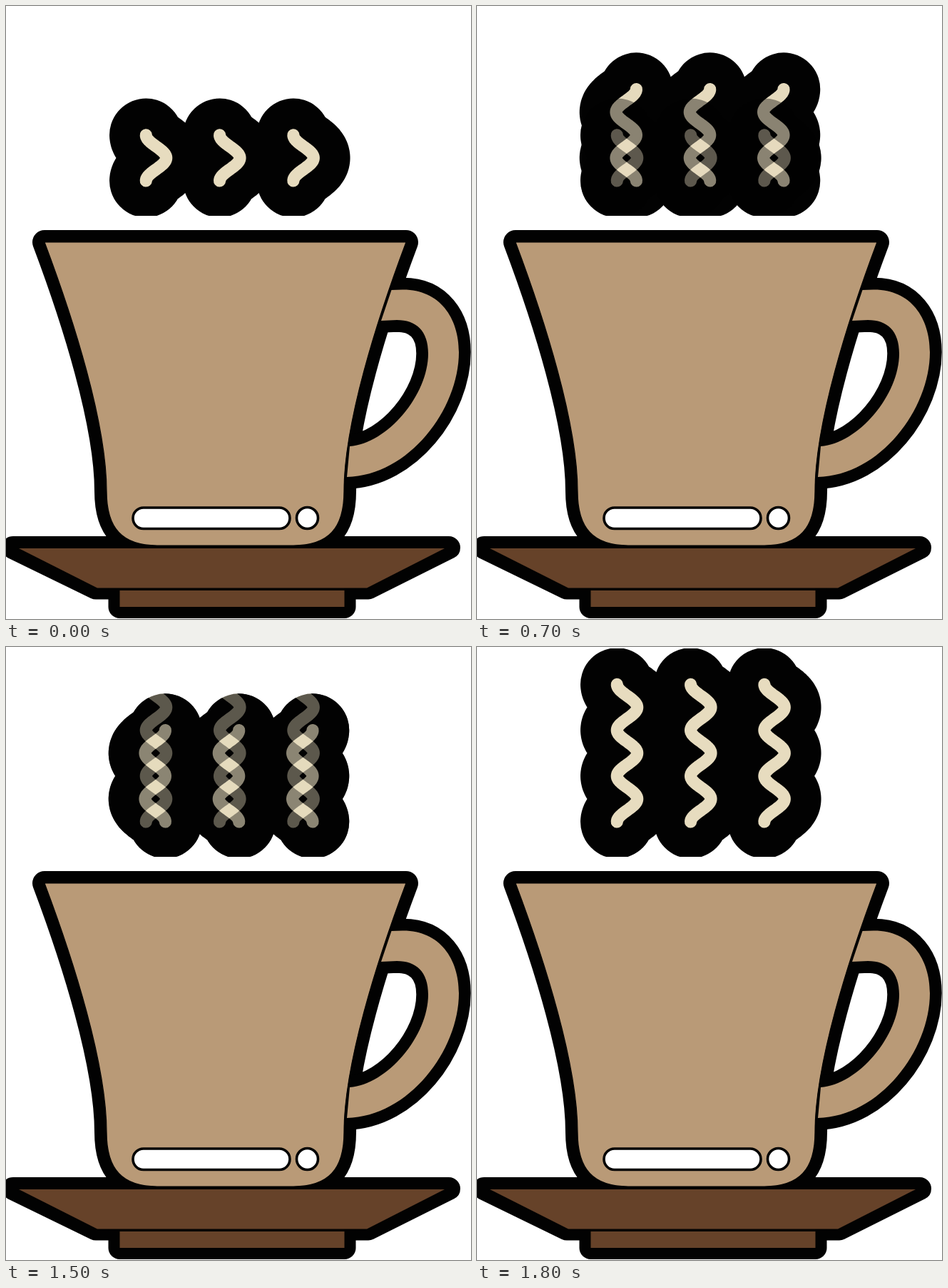
An HTML page with a canvas for the animation above (2.3 s loop, 652 px wide and 859 px high).

```html
<!DOCTYPE html>
<html lang="en">
<head>
<meta charset="utf-8">
<title>Steaming cup</title>
<style>
  html, body { margin: 0; width: 100%; height: 100%; overflow: hidden; background: #fff; }
  canvas { display: block; }
</style>
</head>
<body>
<canvas id="stage" width="652" height="859"></canvas>
<script>
const ctx = document.getElementById('stage').getContext('2d');
const BLACK = '#020202', CREAM = '#e5dabd', CUP = '#b99a77', WOOD = '#664229';
const LOOP = 2300, HOLD = 500, STEP = 100, FADE_STEPS = 5, CYCLE = 900;
const BASE_Y = 245, HALF_WAVE = 32.1, COLUMN_GAP = 103.3, AMPLITUDE = 14.2;
const STEAM_BOTTOM = 294;

// Three heights of steam; top is where the dark halo is cut off.
const poses = [
  makePose(2, 210.5, -1, 128),
  makePose(4, 209.2, 1, 64),
  makePose(6, 210.5, -1, 2)
];

function makePose(halves, mid, side, top) {
  const path = new Path2D();
  const height = halves * HALF_WAVE;
  for (let col = 0; col < 3; col++) {
    for (let i = 0; i <= halves * 24; i++) {
      const d = height * i / (halves * 24);
      const x = mid + col * COLUMN_GAP + side * AMPLITUDE * Math.cos(Math.PI * d / HALF_WAVE);
      if (i === 0) path.moveTo(x, BASE_Y);
      else path.lineTo(x, BASE_Y - d);
    }
  }
  return { path, top };
}

function line(path, color, width) {
  ctx.strokeStyle = color;
  ctx.lineWidth = width;
  ctx.stroke(path);
}

function fill(path, color) {
  ctx.fillStyle = color;
  ctx.fill(path);
}

function halo(pose, alpha = 1) {
  ctx.save();
  ctx.beginPath();
  ctx.rect(0, pose.top, 652, STEAM_BOTTOM - pose.top);
  ctx.clip();
  ctx.globalAlpha = alpha;
  line(pose.path, BLACK, 102.5);
  ctx.restore();
}

function wave(pose, mode, alpha = 1) {
  ctx.save();
  ctx.globalCompositeOperation = mode;
  ctx.globalAlpha = alpha;
  line(pose.path, CREAM, 17.2);
  ctx.restore();
}

function drawSteam(from, to, p) {
  halo(from);
  if (p > 0) {
    if (p > 0.5) halo(to);
    wave(to, 'source-atop');
    halo(from, 1 - p);
  }
  wave(from, 'lighter', 1 - p);
}

const body = new Path2D(`M54 331 C95 440 141 585 141 680 C141 732 163 756 212 756
  L403 756 C452 756 474 732 474 680 C474 585 520 440 561 331 Z`);
const handle = new Path2D(`M540.5 398 L556 397.5 C608 397 635 437 635 485
  C635 565 565 658 478 660 L482 617 C535 613 592 545 592 487
  C592 455 575 440 548 440 L526 441 Z`);
const dishEdge = new Path2D('M10 759 L621 759 L508 815.5 L126 815.5 Z');
const dish = new Path2D('M18 760 L615 760 L506 815.5 L128 815.5 Z');
const foot = new Path2D('M159.5 819 H474.5 V842 H159.5 Z');
const shine = new Path2D();
shine.roundRect(178, 703, 220, 29.5, 14.75);
shine.moveTo(437.5, 717.5);
shine.arc(422.5, 717.5, 15, 0, Math.PI * 2);

function drawCup() {
  line(body, BLACK, 34);
  line(handle, BLACK, 33.5);
  for (const part of [dishEdge, foot]) {
    line(part, BLACK, 32);
    fill(part, BLACK);
  }
  fill(handle, CUP);
  fill(dish, WOOD);
  fill(foot, WOOD);
  fill(body, CUP);
  line(body, BLACK, 1.2);
  fill(shine, '#fff');
  line(shine, BLACK, 3.6);
}

function draw() {
  const t = performance.now() % LOOP;
  const stage = Math.floor(t / CYCLE);
  const local = t % CYCLE;
  const p = local < HOLD ? 0 : (Math.floor((local - HOLD) / STEP) + 1) / FADE_STEPS;
  ctx.clearRect(0, 0, 652, 859);
  drawSteam(poses[stage], poses[(stage + 1) % 3], p);
  drawCup();
  requestAnimationFrame(draw);
}

ctx.lineCap = ctx.lineJoin = 'round';
draw();
</script>
</body>
</html>
```
